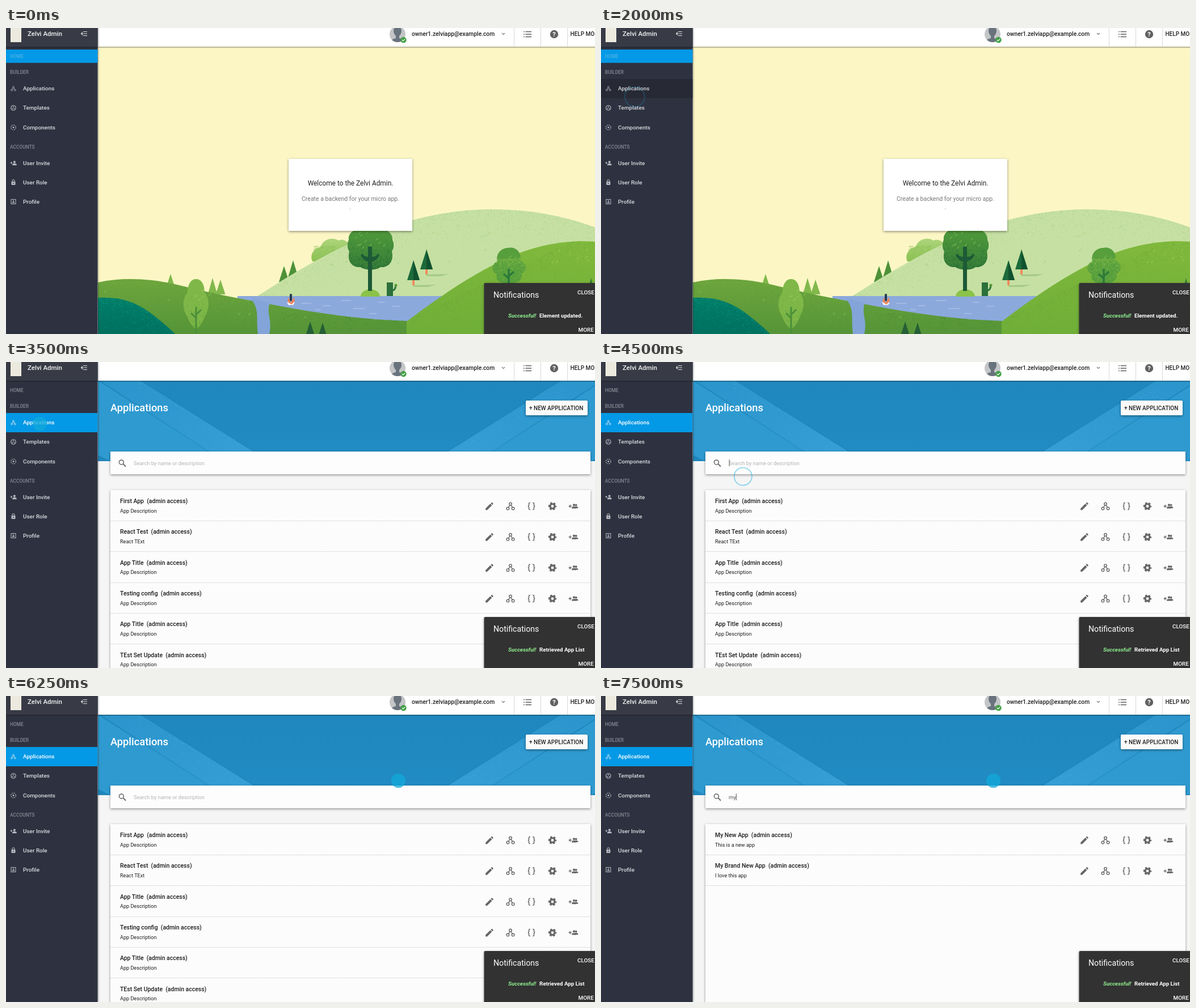
An HTML page for the animation above (8000 ms loop, 1038 by 540 pixels).

```html
<!DOCTYPE html>
<html lang="en">
<head>
<meta charset="utf-8">
<title>Admin console</title>
<style>
  html, body { margin: 0; width: 100%; height: 100%; overflow: hidden; background: #fff; }
  svg { display: block; width: 100vw; height: 100vh; }
  text { font-family: Roboto, sans-serif; white-space: pre; }
</style>
</head>
<body>
<svg id="stage" viewBox="0 0 1038 540" preserveAspectRatio="none"></svg>
<script>
const LOOP = 8000;
const BLUE = '#0499e6';

// ---- helpers -------------------------------------------------------------
const text = (x, y, s, size, fill, weight = 400, extra = '') =>
  `<text x="${x}" y="${y}" font-size="${size}" fill="${fill}" font-weight="${weight}" ${extra}>${s}</text>`;
const rect = (x, y, w, h, fill, extra = '') =>
  `<rect x="${x}" y="${y}" width="${w}" height="${h}" fill="${fill}" ${extra}/>`;
const circle = (x, y, r, fill, extra = '') =>
  `<circle cx="${x}" cy="${y}" r="${r}" fill="${fill}" ${extra}/>`;
const path = (d, fill, extra = '') => `<path d="${d}" fill="${fill}" ${extra}/>`;
const line = (d, color, width = 1, extra = '') =>
  path(d, 'none', `stroke="${color}" stroke-width="${width}" ${extra}`);
const group = (x, y, body, extra = '') => `<g transform="translate(${x} ${y})" ${extra}>${body}</g>`;
const gradient = (id, from, to, dir = 'x2="0" y2="1"') =>
  `<linearGradient id="${id}" ${dir}><stop stop-color="${from}"/><stop offset="1" stop-color="${to}"/></linearGradient>`;

let seed = 7;
const rnd = () => (seed = (seed * 16807) % 2147483647) / 2147483647;

// Grain that thins out away from an edge given by at(x)
function grain(n, x0, x1, at, depth, color) {
  let d = '';
  for (let i = 0; i < n; i++) {
    const x = x0 + rnd() * (x1 - x0);
    d += `M${x.toFixed(1)} ${(at(x) + depth * rnd() * rnd()).toFixed(1)}h1`;
  }
  return line(d, color, 1);
}

// ---- icons, centred on the origin ------------------------------------------
const person = (x, y, s, fill) => group(x, y,
  circle(0, -2.2, 2.1, fill) + path('M-4 4v-1.2C-4 1 -1.5 .6 0 .6S4 1 4 2.8V4z', fill), `style="scale:${s}"`);
const nodes = (c, s = 1) => `<g fill="none" stroke="${c}" stroke-width="1.4" transform="scale(${s})">
  <circle cy="-4" r="2.3"/><circle cx="-4.6" cy="4" r="2.3"/><circle cx="4.6" cy="4" r="2.3"/>
  <path d="M-1 -1.8L-3.4 2M1 -1.8L3.4 2"/></g>`;
const pencil = c => path('M3 17.25V21h3.75L17.81 9.94l-3.75-3.75zM20.71 7.04a1 1 0 0 0 0-1.41l-2.34-2.34a1 1 0 0 0-1.41 0l-1.83 1.83 3.75 3.75z',
  c, 'transform="scale(.76) translate(-12 -12)"');
const braces = c => line('M-2.2 -6h-1q-1.3 0-1.3 1.4v2.6q0 2-1.8 2q1.8 0 1.8 2v2.6q0 1.4 1.3 1.4h1' +
  'M2.2 -6h1q1.3 0 1.3 1.4v2.6q0 2 1.8 2q-1.8 0-1.8 2v2.6q0 1.4-1.3 1.4h-1', c, 1.5);
const gear = c => circle(0, 0, 4, 'none', `stroke="${c}" stroke-width="3.2"`) +
  circle(0, 0, 6, 'none', `stroke="${c}" stroke-width="2.4" stroke-dasharray="3.4 2.88" stroke-dashoffset="1.7"`);
const addPeople = c => line('M-8.5 0h5.4M-5.8 -2.7v5.4', c, 1.4) +
  person(1, 0, 1, c) + person(5.2, 0, .9, c);
const addPerson = c => line('M-5.5 -.5h4M-3.5 -2.5v4', c, 1.1) + person(2, 0, .95, c);
const searchIcon = c => circle(-1.6, -1.6, 4, 'none', `stroke="${c}" stroke-width="1.5"`) +
  line('M1.4 1.4L6 6', c, 1.9);
const ringIcon = (c, extra = '') => circle(0, 0, 4.3, 'none', `stroke="${c}" stroke-width="1.1" ${extra}`);
const menuIcons = {
  Applications: c => nodes(c, .62),
  Templates: c => ringIcon(c) + circle(0, -1.7, 1, c) + circle(-1.7, 1.2, 1, c) + circle(1.7, 1.2, 1, c),
  Components: c => ringIcon(c, 'stroke-dasharray="2.2 1.2"') + circle(0, 0, 1.4, c),
  'User Invite': addPerson,
  'User Role': c => rect(-3.5, -1.5, 7, 6, c, 'rx="1"') + line('M-2 -1.5v-1.3a2 2 0 0 1 4 0v1.3', c, 1.1) + circle(0, 1.5, .9, '#2d303e'),
  Profile: c => rect(-4, -4, 8, 8, 'none', `stroke="${c}"`) + person(0, .3, .55, c)
};

// ---- landscape ---------------------------------------------------------------
const pine = (x, y, w, h, fill) => path(`M${x} ${y}l${w / 2} ${h}h${-w}z`, fill);
const leaves = (n, x, y, w, h, c) => {
  let d = '';
  for (let i = 0; i < n; i++) d += `M${(x + rnd() * w).toFixed(1)} ${(y + rnd() * h).toFixed(1)}l3 -3`;
  return line(d, c, 1.4, 'stroke-linecap="round" opacity=".6"');
};
const clip = (id, d, body) => `<clipPath id="${id}"><path d="${d}"/></clipPath><g clip-path="url(#${id})">${body}</g>`;

function landscape() {
  const far = 'M440 475C500 436 570 394 640 365C710 336 785 320 855 320C925 320 985 332 1038 352V540H440z';
  const left = 'M162 449C210 438 262 443 310 455C370 470 425 480 490 492C570 507 640 515 708 517L860 500V540H162z';
  const right = 'M706 518C770 470 830 428 900 399C950 379 1000 374 1038 377V540H706z';
  const teal = 'M162 476C198 474 226 482 252 501C272 516 286 528 298 540H162z';
  const crown = 'M604 374C602 357 622 352 642 352S682 357 681 374C685 382 683 390 680 394C684 410 676 423 660 422C652 428 633 428 625 422C608 423 601 410 605 394C601 388 601 380 604 374z';
  const round = 'M866 412C862 396 876 387 886 388C897 385 910 396 906 410C918 414 919 430 908 434C912 446 898 452 886 450C873 452 861 446 865 434C854 430 855 416 866 412z';
  const drop = 'M335 443C346 443 350 456 350 466C360 478 358 497 351 508C347 520 340 528 335 532C330 528 323 520 319 508C311 497 310 478 320 466C320 456 324 443 335 443z';
  const farEdge = x => x < 640 ? 475 - (x - 440) * .55 : 320 + Math.pow((x - 855) / 33, 2);
  const tuft = (x, y) => pine(x, y, 22, 35, '#1c6a3b') + path(`M${x} ${y}l11 35h-11z`, '#11522f') +
    rect(x - 2, y + 35, 4, 9, '#f08a5d') + path(`M${x} ${y + 44}l40 -1l-14 4h-26z`, '#8fbd74', 'opacity=".6"');
  return rect(162, 33, 876, 507, '#fcf6c5') +
    path('M540 412C534 398 545 388 555 386C558 372 576 368 586 375C596 370 608 380 606 390L616 412z', 'url(#bush)') +
    grain(220, 542, 580, () => 385, 35, '#8bbf58') +
    pine(490, 420, 18, 28, '#4d9138') + pine(506, 410, 18, 30, '#4d9138') +
    path(far, '#c6e0a3') +
    clip('farClip', far, grain(1500, 440, 1038, farEdge, 100, '#aace83') + leaves(16, 560, 350, 430, 70, '#a2cd73')) +
    path('M408 473H770L708 518C600 518 500 500 408 480z', '#8ca9dc') +
    line('M520 486h18M558 490h14M590 481h18M612 495h20M655 484h12M680 491h14M640 504h13M545 497h10', '#c0d2f0', 1, 'opacity=".8"') +
    pine(290, 434, 13, 20, '#81b84b') + pine(364, 441, 16, 28, '#81b84b') + pine(378, 444, 17, 26, '#81b84b') +
    path(left, 'url(#meadow)') +
    clip('leftClip', left, grain(700, 480, 845, x => 501 + (x - 480) * .07, 34, '#4a8934') +
      grain(500, 162, 430, x => 447 + Math.pow((x - 230) / 36, 2), 60, '#76ad43') + leaves(22, 172, 455, 630, 75, '#8fc15a')) +
    path('M431 477C448 497 440 511 444 540H464C470 514 458 505 465 485z', '#83a4d9') +
    path(teal, 'url(#teal)') + clip('tealClip', teal, grain(450, 162, 298, x => 476 + Math.pow(Math.max(0, x - 175) / 15, 2), 60, '#0c947b')) +
    path(right, 'url(#hill)') +
    clip('rightClip', right, grain(900, 710, 1038, x => 517 - (x - 706) * .48, 75, '#68a238') + leaves(14, 790, 390, 240, 60, '#a5cf60')) +
    path(round, '#579f3c') + clip('roundClip', round, grain(420, 855, 917, () => 408, 44, '#85b94b')) +
    line('M886 425v40M886 442l-9 -8M886 438l9 -8', '#2d7a3b', 3.5) +
    leaves(7, 865, 396, 44, 30, '#8cc152') +
    pine(1031, 441, 16, 30, '#377d37') +
    path('M625 474a17 13 0 0 1 34 0z', '#8bc34a') +
    path(crown, 'url(#crown)') + clip('crownClip', crown, grain(800, 602, 684, x => 428 - Math.pow((x - 642) / 17, 2), -48, '#256a35')) +
    leaves(12, 612, 360, 62, 30, '#8cc152') +
    path('M638 386h7v18q8 0 10-6l3 3q-4 9-13 11v52h-7v-52q-9-2-13-11l3-3q3 6 10 6z', '#1d5a36') +
    rect(671, 449, 11, 24, '#2c703c') + line('M681 463q5 0 6-9', '#2c703c', 3) + circle(687, 454, 2.6, '#5b9b3e') +
    tuft(718, 410) + tuft(741, 391) +
    path(drop, '#7fb848') + clip('dropClip', drop, grain(500, 312, 360, () => 530, -65, '#65a540')) +
    line('M335 492v47M335 512l-9 -9M335 506l9 -9', '#4b8f39', 3) + leaves(7, 320, 460, 26, 30, '#a2d064') +
    pine(536, 518, 18, 28, '#255f35') + pine(558, 520, 18, 28, '#255f35') +
    path('M495 484h14l-3 5h-8z', '#f4f4f8') + path('M498 475l4 10l5 -10l2 7l-6 6l-7 -5z', '#ef8458') + rect(500, 469, 4, 13, '#263b50', 'rx="2"') +
    rect(498, 231, 218, 127, '#fff', 'filter="url(#lift)"') +
    text(607, 278, 'Welcome to the Zelvi Admin.', 11.9, '#212121', 400, 'text-anchor="middle"') +
    text(607, 304.5, 'Create a backend for your micro app.', 10.5, '#757575', 400, 'text-anchor="middle"') +
    text(607, 320, '.', 10.5, '#757575', 400, 'text-anchor="middle"');
}

// ---- applications page ---------------------------------------------------------
function banner() {
  const fold = '<path d="M162 33L357 158L385 175H162z" fill="#2f9ad0"/>' +
    '<path d="M165 33H238L437 158L464 175H384L357 158z" fill="url(#fold)"/>' +
    line('M238 33L464 175', '#1a78aa', 1.5, 'opacity=".45"') + line('M165 33L384 175', '#1b7fb3', 1.5, 'opacity=".35"') +
    path('M162 164L184 175H162z', '#1f86bb');
  return clip('bannerClip', 'M162 33H1038V175H162z',
    rect(162, 33, 876, 142, 'url(#sky)') + fold +
    `<g transform="translate(1215 0) scale(-1 1)">${fold}</g>` +
    grain(50, 230, 420, x => 33 + (x - 230) * .6, 40, '#55addb') +
    grain(50, 800, 990, x => 33 + (990 - x) * .6, 40, '#55addb'));
}

function rows(items) {
  const tools = [pencil, nodes, braces, gear, addPeople];
  return items.map(([name, note], i) => {
    const y = 226 + i * 54.35;
    return text(201, y + 23, `${name}  (admin access)`, 10.45, '#1d1d1d', 500) +
      text(201, y + 39.6, note, 9.1, '#1d1d1d') +
      tools.map((icon, k) => group(852 + k * 37, y + 28.5, icon('#666'))).join('') +
      line(`M184 ${Math.round(y + 54) + .5}H1030`, '#d2d2d2', 1, 'stroke-dasharray="2 1"');
  }).join('');
}

const allApps = [['First App', 'App Description'], ['React Test', 'React TExt'], ['App Title', 'App Description'],
  ['Testing config', 'App Description'], ['App Title', 'App Description'], ['TEst Set Update', 'App Description']];
const myApps = [['My New App', 'This is a new app'], ['My Brand New App', 'I love this app']];

const appPage = () => rect(162, 33, 876, 507, '#f5f5f5') + banner() +
  text(184, 87, 'Applications', 18.3, '#fff', 500) +
  rect(916, 68, 109, 26, '#fafafa', 'rx="2" filter="url(#lift)"') +
  text(922, 84.5, '+ NEW APPLICATION', 10, '#212121', 500) +
  rect(184, 226, 846, 330, '#fcfcfc', 'filter="url(#lift)"') +
  `<g id="all">${rows(allApps)}</g><g id="mine">${rows(myApps)}</g>` +
  rect(184, 158, 846, 40, '#fdfdfd', 'filter="url(#lift)"') +
  group(205, 178.5, searchIcon('#666')) +
  `<g id="hint">${text(225, 181.5, 'Search by name or description', 9.27, '#b3b3b3')}</g>` +
  `<g id="query">${text(225, 181.5, 'my', 9.6, '#555')}</g>` +
  rect(225.5, 172, 1, 12, '#555', 'id="caret"');

// ---- frame around the pages ------------------------------------------------------
function sidebar() {
  const item = (name, y) => `<g id="${name.replace(' ', '')}" fill="#d4d5d9">` +
    group(13, y + .5, menuIcons[name]('#b9bbc2')) + text(30, y + 3.5, name, 9.95, '#d9dade', 500) + '</g>';
  const head = (s, y, id = '') => text(7, y, s, 8.4, '#868892', 500, id);
  return rect(0, 0, 161.5, 540, '#2e313f', 'filter="url(#side)"') + rect(0, 0, 161.5, 33, '#383b46') +
    rect(0, 33, 161.5, 2, '#262934') +
    rect(8, 0, 19, 25, '#eceadf') +
    text(38, 14, 'Zelvi Admin', 11.5, '#f2f2f2', 500) +
    line('M136 6.500h7M138 10h5M136 13.500h7M132.500 10h5M135 7.500L132.500 10L135 12.500', '#e0e0e0', 1.1) +
    rect(0, 90, 161.5, 34, '#272a35', 'id="hover"') + rect(0, 38, 161.5, 23.5, BLUE, 'id="active"') +
    head('HOME', 52.5, 'id="home"') + head('BUILDER', 81) + head('ACCOUNTS', 212.5) +
    item('Applications', 106.5) + item('Templates', 140.5) + item('Components', 175) +
    item('User Invite', 238) + item('User Role', 272) + item('Profile', 306);
}

const topbar = () => rect(162, -6, 880, 39, '#fff', 'filter="url(#bar)"') +
  line('M895.500 0V33M942.500 0V33M989.500 0V33', '#d8d8d8') +
  clip('face', 'M676 11a14 14 0 0 1 28 0a14 14 0 0 1 -28 0z',
    rect(675, -4, 30, 30, '#c3c5c7') + path('M677 26q1-6 10-8v-4q-4-4-4-9q0-7 7-7t7 7q0 5-4 9v4q9 2 10 8z', '#69737d')) +
  circle(700.5, 21, 5.2, '#43a047') + line('M698 21l1.800 1.900L703.200 19.300', '#fff', 1.2) +
  text(715, 14, 'owner1.zelviapp@example.com', 10.25, '#212121', 500) +
  line('M874 9l2.500 2.500L879 9', '#777', 1.1) +
  [6.5, 11, 15.5].map(y => rect(912, y - .8, 1.8, 1.6, '#666') + rect(915.5, y - .8, 10.5, 1.6, '#666')).join('') +
  circle(966, 11, 7.2, '#616161') + text(966, 15, '?', 11, '#fff', 700, 'text-anchor="middle"') +
  text(994.5, 13.5, 'HELP MODE', 10, '#212121', 500);

const notice = () => rect(842.5, 450, 200, 100, '#303030', 'rx="2" filter="url(#lift)"') +
  text(859, 476, 'Notifications', 14.15, '#fff') +
  text(1007, 470, 'CLOSE', 9.9, '#fff', 500) + text(1008.5, 536, 'MORE', 9.9, '#fff', 500) +
  text(885, 511, 'Successful!', 9.7, '#8ff08f', 700, 'font-style="italic"') +
  text(940, 511, '', 9.7, '#fff', 700, 'id="status"');

const shadow = (id, dx, dy, blur, a) => `<filter id="${id}" x="-20%" y="-20%" width="140%" height="150%">
  <feDropShadow dx="${dx}" dy="${dy}" stdDeviation="${blur}" flood-opacity="${a}"/></filter>`;

const stage = document.getElementById('stage');
stage.innerHTML = `<defs>
  ${shadow('lift', 0, 1.5, 2.2, .42)}${shadow('side', 1, 0, 1.6, .4)}${shadow('bar', 0, 1, 1, .5)}
  ${gradient('bush', '#add57c', '#8cc152')}${gradient('meadow', '#6ca53c', '#559438')}
  ${gradient('teal', '#007d68', '#00705f')}${gradient('hill', '#80b93c', '#6fae38')}
  ${gradient('crown', '#4f9a3b', '#3a8038')}${gradient('sky', '#1f87bd', '#218cc3')}
  ${gradient('fold', '#2a94cb', '#37a0d6', 'x2="1" y2="1"')}
  </defs><g id="welcome">${landscape()}</g><g id="apps">${appPage()}</g>
  ${topbar()}${sidebar()}${notice()}
  ${circle(0, 0, 12.6, '#10aadb', 'id="dot" opacity=".75"')}
  ${circle(0, 0, 17, 'none', 'id="ring" stroke="#1fb0e0" stroke-width="1.8"')}`;

// ---- motion -------------------------------------------------------------------
const el = id => document.getElementById(id);
const set = (id, attrs) => { for (const k in attrs) el(id).setAttribute(k, attrs[k]); };
const show = (id, on) => set(id, { visibility: on ? 'visible' : 'hidden' });

// time, x, y, and whether the pointer is a resting ring
const pointer = [
  [750, 184.5, 47], [1000, 75.5, 100], [1250, 59.5, 109], [1500, 59.5, 121.5, true], [3000, 59.5, 109],
  [4000, 207.5, 166.5], [4250, 250, 190], [4500, 250.3, 202, true], [5000, 268, 202], [5250, 691.5, 149.5]
];
const within = (t, a, b) => t >= a && t < b;

function draw(t) {
  const inApps = t >= 3500, typed = t >= 7000, found = t >= 7500;
  el('welcome').style.display = inApps ? 'none' : '';
  el('apps').style.display = inApps ? '' : 'none';
  el('all').style.display = found ? 'none' : '';
  el('mine').style.display = found ? '' : 'none';
  el('hint').style.display = typed ? 'none' : '';
  el('query').style.display = typed ? '' : 'none';

  show('hover', within(t, 1500, 3500));
  set('active', inApps ? { y: 90, height: 34 } : { y: 38, height: 23.5 });
  set('home', { fill: inApps ? '#868892' : '#4bb1e6' });
  el('Applications').style.filter = inApps ? 'brightness(1.25)' : '';
  el('status').textContent = inApps ? 'Retrieved App List' : 'Element updated.';

  const caretOn = within(t, 4500, 5000) || within(t, 5500, 6250) || within(t, 6750, LOOP);
  el('caret').style.display = inApps && caretOn ? '' : 'none';
  set('caret', { x: typed ? 237.8 : 225.7 });

  const stop = pointer.filter(p => p[0] <= t).pop();
  show('dot', stop && !stop[3]);
  show('ring', stop && stop[3]);
  if (!stop) return;
  const [start, x, y, resting] = stop;
  if (resting) {
    const phase = Math.floor((t - start) / 250) % 3;
    set('ring', { cx: x, cy: y, r: 15.6 + phase * .9, opacity: .5 - phase * .13 });
  } else {
    set('dot', { cx: x, cy: y });
  }
}

const begin = performance.now();
function tick() {
  draw((performance.now() - begin) % LOOP);
  requestAnimationFrame(tick);
}
tick();
</script>
</body>
</html>
```
